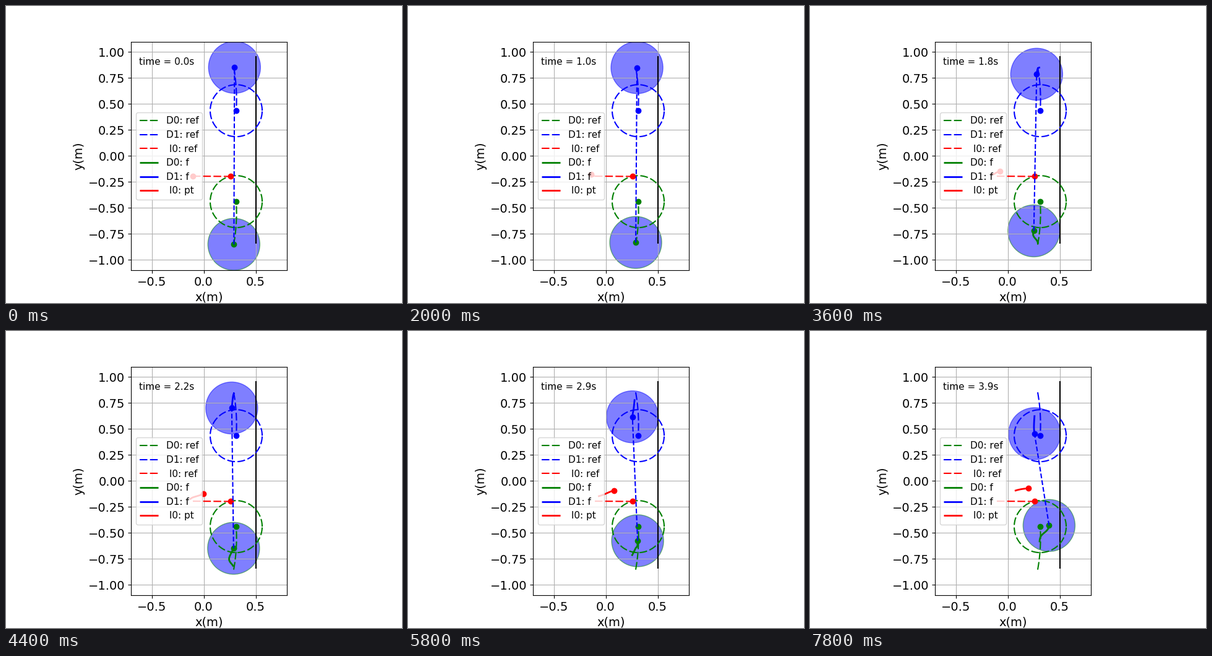
A matplotlib script that plays this animation: 640x480 px, repeating every 8000 ms.

```python
import numpy as np
import matplotlib.pyplot as plt
from matplotlib.animation import FuncAnimation
from matplotlib.patches import Circle

plt.rcParams["text.kerning_factor"] = 6

FRAMES, DT, TAIL = 40, 0.1, 11
RADIUS = 0.25
DASH = (0, (6, 2))
COLORS = {"D0": "green", "D1": "blue", "I0": "red"}


def ramp(t, start, speed):
    """At rest until start, then steady motion, with a soft corner."""
    return speed * 0.2 * np.log1p(np.exp((t - start) / 0.2))


def bump(t, centre, width=0.35):
    return np.exp(-((t - centre) / width) ** 2)


def step(t, centre, width):
    return 1 / (1 + np.exp((centre - t) / width))


def defender_0(t):
    x = (0.29 - 0.047 * bump(t, 1.65) + 0.015 * step(t, 2.35, 0.06)
         + 0.095 * step(t, 3.43, 0.13))
    y = -0.85 + ramp(t, 1.03, 0.147) + 0.033 * bump(t, 2.1)
    return np.column_stack([x, y])


def defender_1(t):
    x = (0.294 + 0.02 * bump(t, 0.65, 0.45) - 0.045 * step(t, 2.1, 0.5)
         + 0.01 * step(t, 3.8, 0.1))
    y = 0.853 - ramp(t, 1.46, 0.163) - 0.03 * bump(t, 2.25)
    return np.column_stack([x, y])


def intruder(t):
    x = (-0.175 + ramp(t, 0.78, 0.12) + 0.068 * bump(t, 0)
         - 0.03 * bump(t, 1.6))
    y = -0.196 + 0.13 * step(t, 2.1, 0.55) + 0.008 * bump(t, 0.7, 0.4)
    return np.column_stack([x, y])


def bowed(y0, y1):
    s = np.linspace(0, 1, 40)
    return 0.288 + 0.024 * s + 0.05 * s * (1 - s), y0 + (y1 - y0) * s


times = np.arange(FRAMES) * DT
paths = {"D0": defender_0(times), "D1": defender_1(times),
         "I0": intruder(times)}
refs = {
    "D0": bowed(-0.853, -0.439),
    "D1": bowed(0.853, 0.436),
    "I0": (np.array([-0.105, 0.258]), np.array([-0.194, -0.197])),
}

fig, ax = plt.subplots(figsize=(6.4, 4.8), dpi=100)
ax.set_aspect("equal")
ax.set_xlim(-0.7, 0.8)
ax.set_ylim(-1.1, 1.1)
ax.set_xticks([-0.5, 0, 0.5])
ax.set_yticks(np.arange(-1, 1.01, 0.25))
ax.tick_params(labelsize=14)
ax.set_xlabel("x(m)", fontsize=14)
ax.set_ylabel("y(m)", fontsize=14)
ax.grid(True)

ax.plot([0.5, 0.5], [-0.835, 0.953], color="black", lw=1.5)
clock = ax.text(0.05, 0.9, "", transform=ax.transAxes, fontsize=11)
angle = np.linspace(0, 2 * np.pi, 100)


def label(name, kind):
    return f"{' ' if name == 'I0' else ''}{name}: {kind}"


for name, (x, y) in refs.items():
    color = COLORS[name]
    ax.plot(x, y, color=color, ls=DASH, lw=1.5, label=label(name, "ref"))
    ax.plot(x[-1], y[-1], "o", color=color)
    if name != "I0":
        ax.plot(x[-1] + RADIUS * np.cos(angle), y[-1] + RADIUS * np.sin(angle),
                color=color, ls=DASH, lw=1.5)

trails, dots, discs = {}, {}, {}
for name, color in COLORS.items():
    kind = "pt" if name == "I0" else "f"
    trails[name], = ax.plot([], [], color=color, lw=2, solid_capstyle="butt",
                            label=label(name, kind))
    dots[name], = ax.plot([], [], "o", color=color)
    if name != "I0":
        discs[name] = ax.add_patch(
            Circle((0, 0), RADIUS, fc="blue", ec=color, alpha=0.5))
link, = ax.plot([], [], "--", color="blue", lw=1.5)
ax.legend(loc="center left", fontsize=11)


def update(i):
    for name, path in paths.items():
        dots[name].set_data(path[i:i + 1].T)
        trails[name].set_data(path[max(0, i - TAIL):i + 1].T)
        if name in discs:
            discs[name].center = path[i]
    link.set_data(np.array([paths["D0"][i], paths["D1"][i]]).T)
    clock.set_text(f"time = {i * DT:.1f}s")


anim = FuncAnimation(fig, update, frames=FRAMES, interval=200,
                     init_func=lambda: update(0), repeat=True, repeat_delay=0)
plt.show()
```
